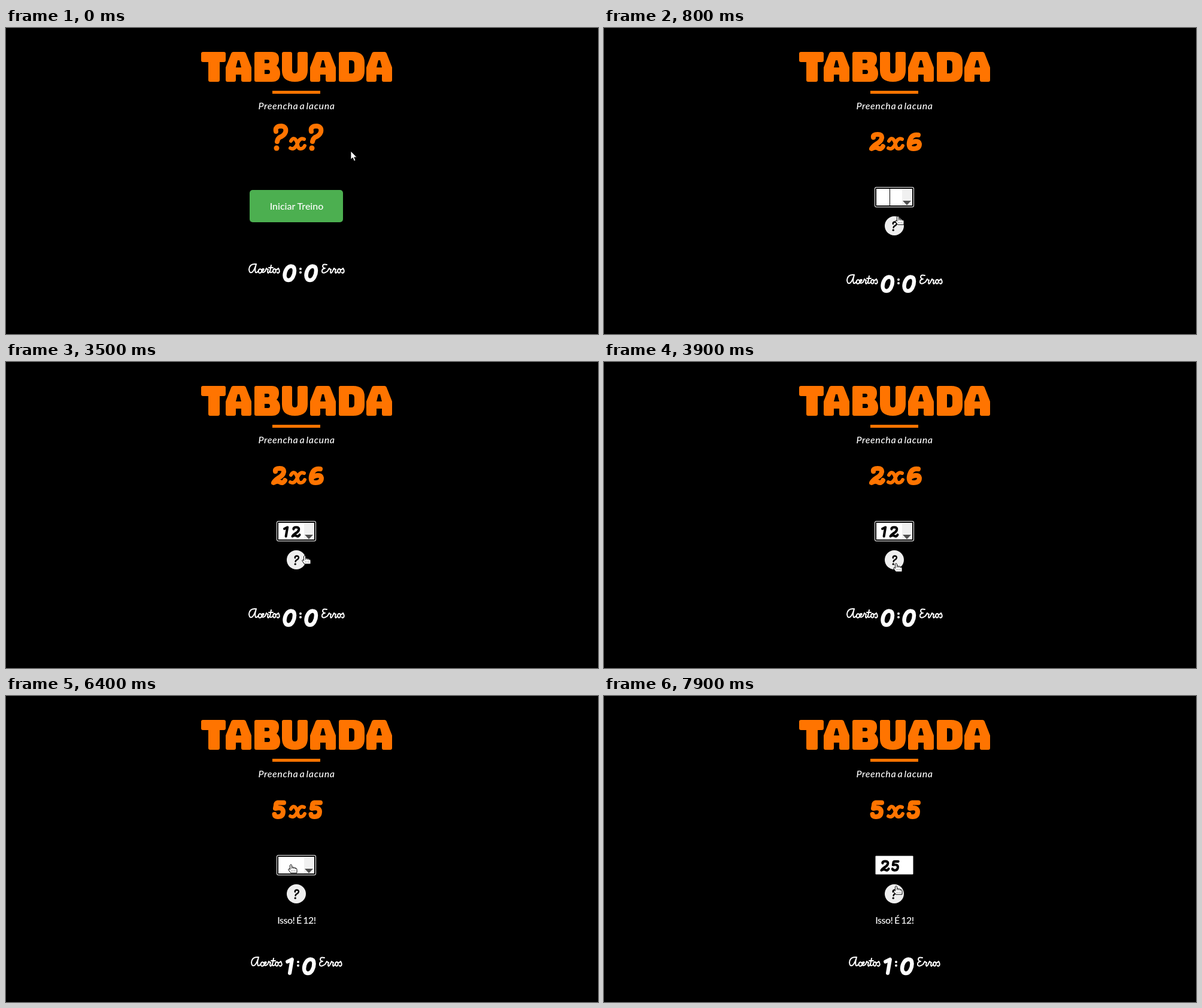
Write an HTML page that moves like this. It is 989 px wide and 512 px high and loops after 8000 ms.

```html
<!DOCTYPE html>
<html lang="pt">
<head>
<meta charset="utf-8">
<title>Tabuada</title>
<style>
html, body { margin: 0; width: 100%; height: 100%; overflow: hidden; background: #000; }
svg { display: block; width: 989px; height: 512px; }
text { font: 500 16px Lato, sans-serif; fill: #fff; text-anchor: middle; }
.hint { font-style: italic; letter-spacing: .6px; word-spacing: -2px; }
.reply { letter-spacing: -.5px; word-spacing: -1px; }
.title { fill: #ff7400; fill-rule: evenodd; }
.ink { fill: none; stroke-width: 8; stroke-linecap: round; stroke-linejoin: round; }
.sum { stroke: #ff7400; }
.dark { stroke: #000; stroke-width: 6.5; }
.light { stroke: #fff; stroke-width: 6.5; }
.script { stroke: #fff; stroke-width: 2; }

/* Hard cuts on one shared 8 s clock */
.cut { animation: 8s step-end infinite; }
.start { animation-name: start; }
.play { animation-name: play; }
.first { animation-name: first; }
.second { animation-name: second; }
.score { animation-name: score; }
.caret1 { animation-name: caret1; }
.caret12 { animation-name: caret12; }
.caret2 { animation-name: caret2; }
.type12 { animation-name: type12; }
.type2 { animation-name: type2; }
.type25 { animation-name: type25; }
.blur { animation-name: blur; }
.arrow { animation-name: arrow; }
.hand { animation-name: hand; }
.pointer { animation-name: pointer; }

@keyframes start { 0% { opacity: 1 } 10%, 100% { opacity: 0 } }
@keyframes play { 0% { opacity: 0 } 10%, 100% { opacity: 1 } }
@keyframes first { 0%, 56.25%, 100% { opacity: 0 } 10% { opacity: 1 } }
@keyframes second { 0% { opacity: 0 } 56.25%, 100% { opacity: 1 } }
@keyframes score {
  0% { opacity: 1; transform: none }
  10% { opacity: 1; transform: translateY(18px) }
  56.25%, 100% { opacity: 0; transform: translateY(18px) }
}
@keyframes caret1 { 0%, 17.5%, 32.5%, 100% { opacity: 0 } 10%, 23.75% { opacity: 1 } }
@keyframes caret12 { 0%, 43.75%, 100% { opacity: 0 } 40% { opacity: 1 } }
@keyframes caret2 { 0%, 65%, 80%, 100% { opacity: 0 } 57.5%, 72.5% { opacity: 1 } }
@keyframes type12 { 0%, 56.25%, 100% { opacity: 0 } 32.5% { opacity: 1 } }
@keyframes type2 { 0%, 88.75%, 100% { opacity: 0 } 83.75% { opacity: 1 } }
@keyframes type25 { 0% { opacity: 0 } 88.75%, 100% { opacity: 1 } }
@keyframes blur { 0% { opacity: 0 } 98.75%, 100% { opacity: 1 } }
@keyframes arrow { 0%, 25% { opacity: 1 } 5%, 42.5%, 100% { opacity: 0 } }
@keyframes hand { 0%, 25%, 83.75% { opacity: 0 } 5%, 42.5%, 92.5%, 100% { opacity: 1 } }
@keyframes pointer {
  0% { transform: translate(576px, 206px) }
  2.5% { transform: translate(569px, 218px) }
  3.75% { transform: translate(548px, 246px) }
  5% { transform: translate(512px, 286px) }
  6.25% { transform: translate(491px, 309px) }
  7.5% { transform: translate(486px, 314px) }
  17.5% { transform: translate(485px, 316px) }
  18.75% { transform: translate(485px, 314px) }
  20% { transform: translate(486px, 312px) }
  23.75% { transform: translate(487px, 309px) }
  25% { transform: translate(492px, 307px) }
  40% { transform: translate(495px, 309px) }
  41.25% { transform: translate(497px, 313px) }
  42.5% { transform: translate(494px, 319px) }
  43.75% { transform: translate(494px, 323px) }
  45% { transform: translate(492px, 328px) }
  46.25% { transform: translate(488px, 332px) }
  47.5% { transform: translate(485px, 335px) }
  48.75% { transform: translate(483px, 336px) }
  65% { transform: translate(482px, 332px) }
  66.25% { transform: translate(478px, 318px) }
  67.5% { transform: translate(474px, 300px) }
  68.75% { transform: translate(472px, 288px) }
  70% { transform: translate(471px, 281px) }
  92.5% { transform: translate(471px, 282px) }
  93.75% { transform: translate(476px, 297px) }
  95% { transform: translate(484px, 318px) }
  96.25%, 100% { transform: translate(483px, 317px) }
}
</style>
</head>
<body>
<svg viewBox="0 0 989 512">
  <defs>
    <path id="A" d="M9 3Q10 0 13 0H30Q33 0 34 3L43 26V47Q43 50 40 50H29Q26 50 26 47V38H17V47Q17 50 14 50H3Q0 50 0 47V26ZM20 14L17 26H26L23 14Z"/>
    <path id="zero" d="M14 3.500C8 3.500 3.500 12 3.500 19C3.500 24 6 27 10 27C16 27 20 18 20 11C20 6 18 3.500 14 3.500Z"/>
    <path id="one" d="M5 8L13 4L9 28"/>
    <path id="two" d="M7 9Q6 4 14 4Q22 4 21 10Q20 16 12 20Q6 24 4 28Q10 24 15 27Q20 30 23 24"/>
    <path id="five" d="M20 4.500H10Q7 5 7 9L6 14Q18 11 19 19Q19 28 10 28Q5 28 4.500 24"/>
    <path id="six" d="M20 5Q8 3 5 17Q3 28 12 28Q22 28 22 20Q21 15 14 16Q7 17 5 22"/>
    <path id="times" stroke-width="6" d="M5 9Q8 3 12 6Q15 9 16 15Q17 22 21 22Q26 22 28 17M27 6Q20 3 16 13Q11 25 4 21"/>
    <g id="ask">
      <path d="M5 13Q3 4 14 4Q23 5 21 14Q19 20 11 23Q8 25 7 30"/>
      <path stroke-width="9" d="M6 41v.1"/>
    </g>
    <path id="hits" d="M417 395Q407 394 406 404Q407 412 412 408Q416 403 418 395Q415 405 417 409Q419 410 421 407M426 404Q424 402 422 405Q421 410 424 410Q427 409 428 407Q432 404 430 403Q427 403 427 407Q428 411 433 407L435 402Q436 404 438 404Q436 409 438 410Q440 409 441 406M443 397L441 407Q441 411 445 408M439 401H446M449 403Q446 403 446 407Q447 411 450 409Q452 405 449 403Q451 405 453 404L455 402Q458 407 456 409Q454 411 453 409"/>
    <path id="misses" d="M536 396Q529 394 529 399Q530 402 533 402Q527 403 528 408Q530 412 537 407L540 402Q541 404 543 404Q541 409 543 410Q545 409 546 406L548 402Q549 404 551 404Q549 409 551 410Q553 409 554 406M557 403Q554 403 554 407Q555 411 558 409Q560 405 557 403Q559 405 561 404L563 402Q566 407 564 409Q562 411 561 409"/>
    <g id="colon" fill="#fff"><circle cy="403" r="2"/><circle cy="409" r="2"/></g>
  </defs>

  <rect width="989" height="512"/>

  <g class="title" role="img" aria-label="TABUADA" transform="translate(326 40)">
    <path d="M3 0H38Q41 0 41 3V14Q41 17 38 17H31V47Q31 50 28 50H15Q12 50 12 47V17H3Q0 17 0 14V3Q0 0 3 0Z"/>
    <use href="#A" x="41"/>
    <path transform="translate(89)" d="M3 0H29Q41 0 41 12Q41 19 37 23Q43 27 43 36Q43 50 29 50H3Q0 50 0 47V3Q0 0 3 0ZM17 13V19H22Q25 19 25 16Q25 13 22 13ZM17 30V37H23Q26 37 26 33.500Q26 30 23 30Z"/>
    <path transform="translate(135)" d="M3 0H14Q17 0 17 3V31Q17 36 21.500 36Q26 36 26 31V3Q26 0 29 0H40Q43 0 43 3V31Q43 50 21.500 50Q0 50 0 31V3Q0 0 3 0Z"/>
    <use href="#A" x="182"/>
    <path transform="translate(230)" d="M3 0H24Q43 0 43 18V32Q43 50 24 50H3Q0 50 0 47V3Q0 0 3 0ZM17 14V36H21Q26 36 26 30V20Q26 14 21 14Z"/>
    <use href="#A" x="276"/>
  </g>
  <rect x="445" y="105" width="80" height="5" fill="#ff7400"/>
  <text class="hint" x="485.500" y="136">Preencha a lacuna</text>

  <g class="cut start">
    <g class="ink sum" role="img" aria-label="? x ?">
      <use href="#ask" x="446" y="160"/>
      <use href="#times" x="471" y="180"/>
      <use href="#ask" x="505" y="160"/>
    </g>
    <rect x="407" y="271" width="156" height="54" rx="5" fill="#4caf50"/>
    <text x="485.500" y="304">Iniciar Treino</text>
  </g>

  <g class="cut first ink sum" role="img" aria-label="2 x 6">
    <use href="#two" x="443" y="174"/>
    <use href="#times" x="471" y="180"/>
    <use href="#six" x="505" y="174"/>
  </g>
  <g class="cut second">
    <g class="ink sum" role="img" aria-label="5 x 5">
      <use href="#five" x="444" y="174"/>
      <use href="#times" x="471" y="180"/>
      <use href="#five" x="505" y="174"/>
    </g>
    <text class="reply" x="485.500" y="381">Isso! É 12!</text>
  </g>

  <g class="cut play">
    <rect x="452" y="266" width="66" height="34" rx="3" fill="#fff"/>
    <rect x="453" y="267" width="64" height="32" rx="2"/>
    <rect x="455" y="269" width="60" height="28" fill="#fff"/>
    <rect x="498" y="269" width="17" height="28" fill="#f0f0f0"/>
    <path d="M499 289H513L506 296.500Z" fill="#505050"/>
    <g class="cut blur">
      <rect x="452" y="266" width="66" height="34"/>
      <rect x="453.500" y="267.500" width="63" height="31" rx="1" fill="#fff"/>
    </g>
    <rect class="cut caret1" x="477" y="269" width="1" height="28"/>
    <rect class="cut caret12" x="494" y="269" width="1" height="28"/>
    <rect class="cut caret2" x="478" y="269" width="1" height="28"/>
    <g class="ink dark">
      <g class="cut type12">
        <use href="#one" transform="translate(462 274) scale(.63)"/>
        <use href="#two" transform="translate(476 274) scale(.63)"/>
      </g>
      <g class="cut type2">
        <use href="#two" transform="translate(469 274) scale(.63)"/>
      </g>
      <g class="cut type25">
        <use href="#two" transform="translate(461 274) scale(.63)"/>
        <use href="#five" transform="translate(479 274) scale(.63)"/>
      </g>
    </g>
    <circle cx="485" cy="331" r="16" fill="#efefef"/>
    <use class="ink dark" href="#ask" transform="translate(481 323) scale(.37)"/>
  </g>

  <g class="cut score">
    <use class="ink script" href="#hits" role="img" aria-label="Acertos"/>
    <use class="ink light" href="#zero" x="462" y="395"/>
    <use href="#colon" x="492"/>
    <use class="ink light" href="#zero" x="498" y="395"/>
    <use class="ink script" href="#misses" role="img" aria-label="Erros"/>
  </g>
  <g class="cut second">
    <g transform="translate(0 42)">
      <use class="ink script" href="#hits" x="4" role="img" aria-label="Acertos"/>
      <use class="ink light" href="#one" transform="translate(465.500 395) scale(.95)"/>
      <use href="#colon" x="488"/>
      <use class="ink light" href="#zero" x="494.500" y="395"/>
      <use class="ink script" href="#misses" x="-4" role="img" aria-label="Erros"/>
    </g>
  </g>

  <g class="cut pointer" fill="#fff" stroke="#000" stroke-linejoin="round">
    <path class="cut arrow" stroke-width=".8" d="M0 0V14L3.200 11L5.500 16.500L8 15.500L5.700 10.200H10Z"/>
    <g class="cut hand">
      <path d="M3.500 2Q5 -.5 6.500 2V5.500Q8 4.700 9 6Q11 5.300 12 6.800Q15 6.700 15 9.500V15H4.500L.8 9.800Q.7 7.500 2.500 8.200L3.500 9.300Z"/>
      <path fill="none" stroke-width=".8" d="M6.500 5.500V8M9.200 6V8.300M12 6.800V8.800M6 11.500h1M8.500 11.500h1M11 11.500h1"/>
    </g>
  </g>
</svg>
</body>
</html>
```
